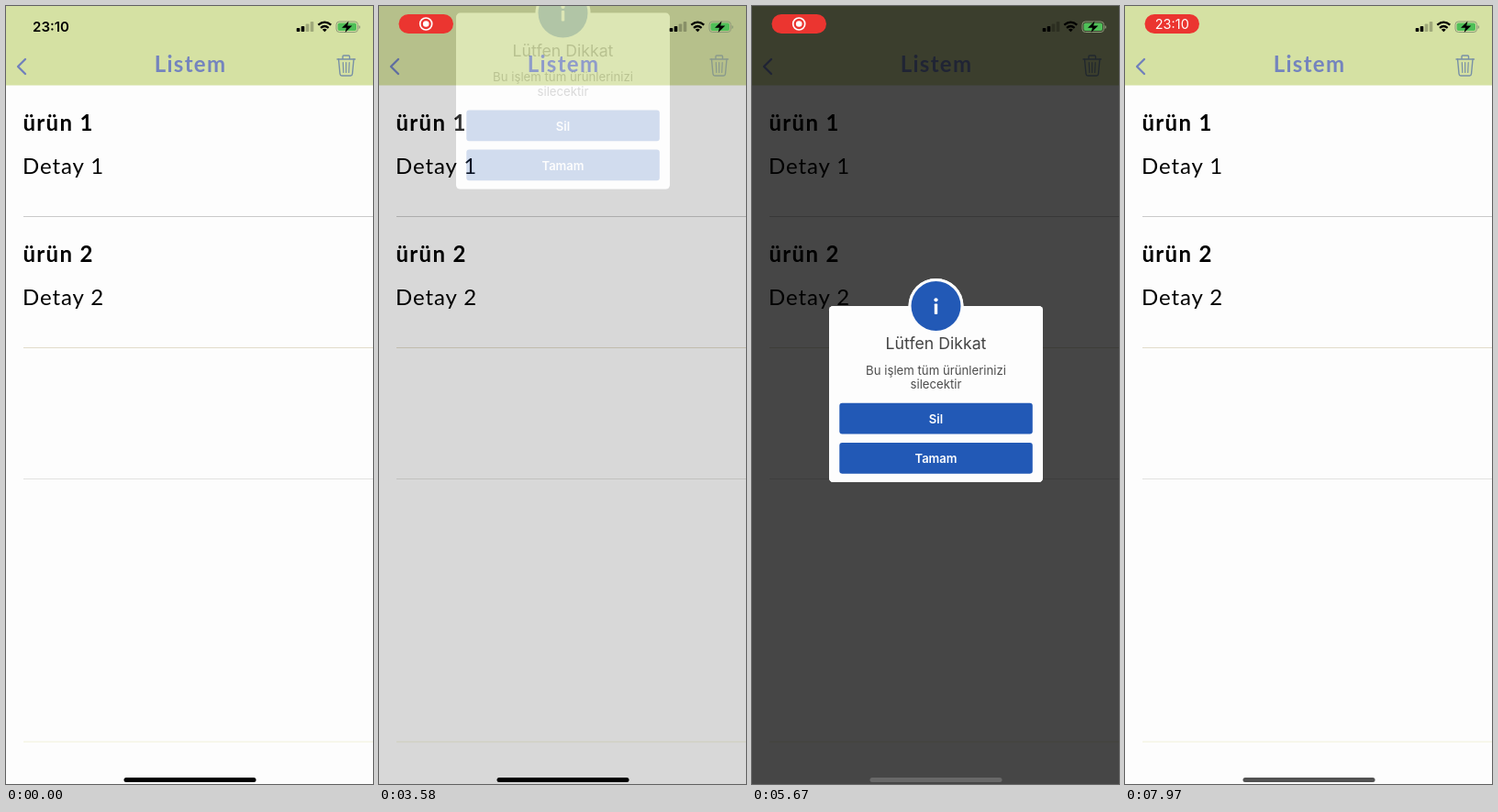
These frames come from a looping animation (400x848 px, 8000 ms). An HTML page:

```html
<!DOCTYPE html>
<html lang="tr">
<head>
<meta charset="utf-8">
<title>Listem</title>
<style>
  html, body { margin: 0; width: 100%; height: 100%; overflow: hidden; background: #fdfdfd; }
  svg { display: block; width: 100vw; height: 100vh; }
  .round { font-family: Lato, "Open Sans", sans-serif; }
  .ui { font-family: Inter, Roboto, sans-serif; }
  .mid { text-anchor: middle; }
</style>
</head>
<body>
<svg viewBox="0 0 400 848" xmlns="http://www.w3.org/2000/svg">
  <defs>
    <g id="shape">
      <rect x="84" y="327" width="233" height="192" rx="4.5"/>
      <circle cx="200.5" cy="327" r="30"/>
    </g>
    <mask id="around" maskUnits="userSpaceOnUse" x="0" y="0" width="400" height="848">
      <rect width="400" height="848" fill="#fff"/>
      <use id="hole" href="#shape" fill="#000"/>
    </mask>
  </defs>

  <rect width="400" height="848" fill="#fdfdfd"/>
  <g id="rows" class="round" font-size="24" fill="#000"></g>

  <rect width="400" height="86.500" fill="#d5e1a3"/>
  <g fill="none" stroke="#7080bc" stroke-linecap="round" stroke-linejoin="round">
    <path d="M21 58L13 66L21 74" stroke-width="2.3"/>
    <g id="trash" stroke="#7890a6" stroke-width="1.4">
      <path d="M361 58H380.500M367 58V55Q367 54 368 54H373.500Q374.500 54 374.500 55V58"/>
      <path d="M362.500 58L364 74Q364.200 76 366 76H375.500Q377.300 76 377.500 74L379 58"/>
      <path d="M367.300 61.500L367.800 72.500M370.700 61.500V72.500M374.200 61.500L373.700 72.500" stroke-width="1.2"/>
    </g>
  </g>
  <text class="round mid" x="201" y="71.500" font-size="24" font-weight="700" letter-spacing="1.3" fill="#7484be">Listem</text>

  <rect id="dim" width="400" height="848" mask="url(#around)"/>

  <g id="alert" class="ui mid">
    <use href="#shape" fill="#fdfdfd"/>
    <g fill="#2259b6">
      <circle cx="200.500" cy="327" r="27"/>
      <rect x="95.300" y="432.800" width="210.500" height="33.800" rx="3"/>
      <rect x="95.300" y="475.900" width="210.500" height="33.800" rx="3"/>
    </g>
    <g fill="#fff">
      <circle cx="200.500" cy="320.300" r="2.100"/>
      <rect x="198.800" y="324.500" width="3.400" height="11.500" rx=".8"/>
    </g>
    <text x="200.500" y="374" font-size="17.700" fill="#444">Lütfen Dikkat</text>
    <g font-size="13.200" fill="#4d4d4d">
      <text x="200.500" y="401.500">Bu işlem tüm ürünlerinizi</text>
      <text x="200.500" y="417.300">silecektir</text>
    </g>
    <g font-size="13" font-weight="600" fill="#fff">
      <text x="200.500" y="455">Sil</text>
      <text x="200.500" y="498">Tamam</text>
    </g>
  </g>

  <g id="signal"></g>
  <g fill="none" stroke="#000" stroke-width="2.2">
    <path d="M340.300 20.700Q347.300 14.700 354.300 20.700"/>
    <path d="M343 23.800Q347.300 20.200 351.600 23.800"/>
  </g>
  <path d="M347.300 28.300L344.800 25.800Q347.300 23.800 349.800 25.800Z"/>
  <rect x="360" y="17" width="23.500" height="11.500" rx="3.400" fill="none" stroke="#8c9a78" stroke-width="1"/>
  <rect x="361.500" y="18.500" width="20.500" height="8.500" rx="2" fill="#4fbf58"/>
  <path d="M384.700 21V25Q386.200 24.500 386.200 23T384.700 21Z" fill="#8c9a78"/>
  <path d="M373.500 16.500L366 23.700H371L369.600 29L377.300 21.600H372.200Z"/>

  <text id="clock" class="ui mid" x="49" y="28" font-size="15" font-weight="600">23:10</text>
  <g id="pill">
    <rect x="21.500" y="9" width="59.500" height="21" rx="10.500" fill="#eb3530"/>
    <g id="rec" fill="#fff">
      <circle cx="51.200" cy="19.500" r="6.500" fill="none" stroke="#fff" stroke-width="1.700"/>
      <circle cx="51.200" cy="19.500" r="3.300"/>
    </g>
    <text id="pillTime" class="ui mid" x="51.300" y="24.700" font-size="14.500" fill="#fff">23:10</text>
  </g>
  <rect id="home" x="128.500" y="841" width="144" height="5" rx="2.500"/>
</svg>

<script>
const LOOP = 8000;
const SHOW = 3410, HIDE = 6260, SPAN = 560, PILL = 1780;
const DROP = -400, BOUNCE = 15, SHADE = 0.72;

const $ = id => document.getElementById(id);
const set = (id, attrs) => {
  for (const k in attrs) $(id).setAttribute(k, attrs[k]);
};
const clamp = v => Math.min(1, Math.max(0, v));
const lerp = (a, b, k) => a + (b - a) * k;

// cubic-bezier(.42, 0, .58, 1)
function ease(x) {
  x = clamp(x);
  let lo = 0, hi = 1;
  for (let i = 0; i < 20; i++) {
    const s = (lo + hi) / 2, r = 1 - s;
    if (1.26 * s * r * r + 1.74 * s * s * r + s * s * s < x) lo = s; else hi = s;
  }
  return 3 * lo * lo - 2 * lo * lo * lo;
}

const row = (n, y) => `
  <text x="18.500" y="${y + 8}" font-weight="700" letter-spacing="1.300">ürün ${n}</text>
  <text x="18" y="${y + 55}" letter-spacing=".9">Detay ${n}</text>`;
const rule = (y, c) => `<rect x="19" y="${y}" width="381" height="1" fill="${c}"/>`;
$('rows').innerHTML = row(1, 128) + row(2, 271) + rule(229, '#cacaca') +
  rule(372, '#e2dccb') + rule(515, '#e2e2e0') + rule(801.5, '#f2f2da');

$('signal').innerHTML = [4, 6, 8.5, 11].map((h, i) =>
  `<rect x="${316.7 + i * 5}" y="${28 - h}" width="3.600" height="${h}" rx=".8" opacity="${i < 2 ? 1 : 0.25}"/>`).join('');

function draw(t) {
  const rise = ease((t - SHOW) / SPAN);
  const shown = t < HIDE ? rise : 1 - ease((t - HIDE) / SPAN);
  const settle = ease((t - SHOW - SPAN) / SPAN);
  const y = lerp(DROP, BOUNCE, rise) - BOUNCE * settle;
  const move = `translate(0 ${y.toFixed(2)})`;
  set('alert', { transform: move, opacity: shown });
  set('hole', { transform: move });
  set('dim', { opacity: SHADE * shown });

  const press = clamp((t - 3160) / 80) * clamp((3900 - t) / 250);
  set('trash', { opacity: 1 - 0.45 * press });

  // The recording pill springs in over the clock
  const u = Math.max(0, (t - PILL) / SPAN);
  const size = 1 - Math.exp(-5 * u) * Math.cos(8 * u);
  set('pill', {
    transform: `translate(51.250 19.500) scale(${size}) translate(-51.250 -19.500)`,
    opacity: clamp(u * 6)
  });
  set('clock', { opacity: clamp(1 - u * 6) });
  set('rec', { opacity: 1 - ease((t - 6540) / 500) });
  set('pillTime', { opacity: ease((t - 6400) / 600) });

  // The home bar lightens once the page behind it is dark
  const bar = 104 * ease((t - 3600) / 1400) - 22 * ease((t - HIDE) / SPAN);
  set('home', { fill: `rgb(${[bar, bar, bar].map(Math.round)})` });
}

const start = performance.now();
function tick() {
  draw((performance.now() - start) % LOOP);
  requestAnimationFrame(tick);
}
tick();
</script>
</body>
</html>
```
